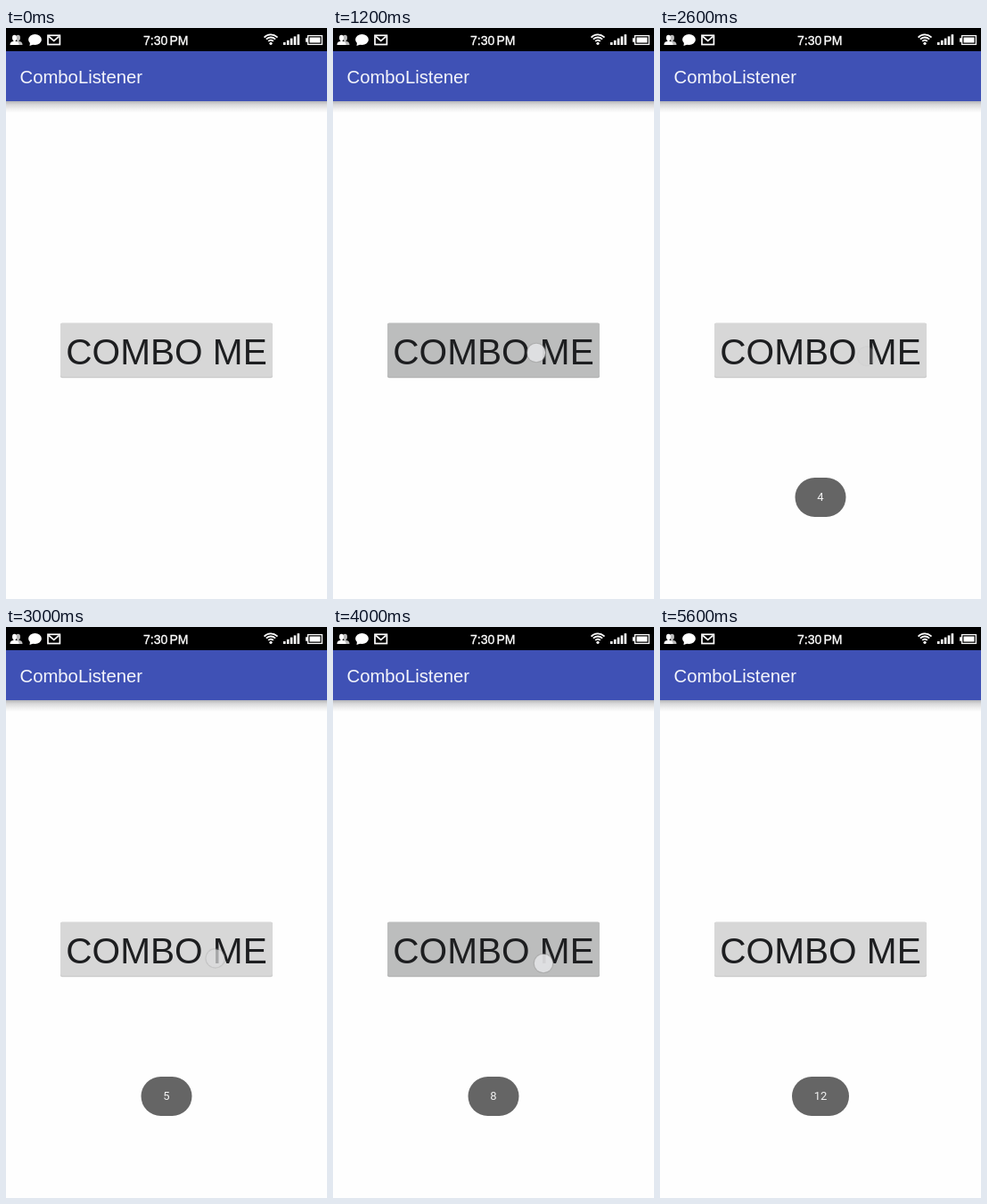
These frames come from a looping animation (360x640 px, 6400 ms). An HTML page with a canvas:

```html
<!DOCTYPE html>
<html lang="en">
<head>
<meta charset="utf-8">
<title>ComboListener</title>
<style>
  html, body { margin: 0; width: 100%; height: 100%; overflow: hidden; background: #fefefe; }
  canvas { display: block; }
</style>
</head>
<body>
<canvas id="stage" width="360" height="640"></canvas>
<script>
const ctx = document.getElementById('stage').getContext('2d');
const LOOP = 6400, STEP = 200, FIRST = 1000;
const SANS = '"Liberation Sans", Arial, sans-serif';

// One letter per step from FIRST: P pressed, R just released, F finger fading, - idle
const TOUCH = 'FPRPRPRPFPRRPRPPRPRPRPF-';
// Step at which the combo counter reaches 2, 3, 4 ...
const HITS = [4, 6, 8, 10, 11, 13, 15, 16, 18, 20, 22];

function rect(x, y, w, h, color) {
  ctx.fillStyle = color;
  ctx.fillRect(x, y, w, h);
}

function round(x, y, w, h, r, color) {
  ctx.fillStyle = color;
  ctx.beginPath();
  ctx.roundRect(x, y, w, h, r);
  ctx.fill();
}

function ellipse(x, y, rx, ry, color) {
  ctx.fillStyle = color;
  ctx.beginPath();
  ctx.ellipse(x, y, rx, ry, 0, 0, Math.PI * 2);
  ctx.fill();
}

function poly(points, color) {
  ctx.fillStyle = color;
  ctx.beginPath();
  points.forEach(([x, y]) => ctx.lineTo(x, y));
  ctx.fill();
}

function text(str, x, y, size, color, family = SANS, align = 'left') {
  ctx.font = `${size}px ${family}`;
  ctx.textAlign = align;
  ctx.fillStyle = color;
  ctx.fillText(str, x, y);
}

function person(x, color) {
  ellipse(x, 11, 2.5, 3.2, color);
  round(x - 1.2, 13, 2.4, 3, 0, color);
  round(x - 5, 15, 10, 4, [4, 4, 0, 0], color);
}

function statusIcons() {
  person(13.5, '#bbb');
  person(9.5, '#fff');

  ellipse(32.5, 13, 7.4, 6, '#fff');
  poly([[27, 16], [26.5, 20], [32, 18]], '#fff');

  ctx.strokeStyle = '#fff';
  ctx.lineWidth = 1.7;
  ctx.strokeRect(47, 8.3, 13.4, 10.2);
  ctx.beginPath();
  ctx.moveTo(48, 9.5);
  ctx.lineTo(53.7, 14.3);
  ctx.lineTo(59.4, 9.5);
  ctx.stroke();

  ctx.lineWidth = 1.8;
  for (const r of [3.8, 7, 10.2]) {
    ctx.beginPath();
    ctx.arc(297, 17.5, r, -Math.PI * 0.76, -Math.PI * 0.24);
    ctx.stroke();
  }
  ellipse(297, 17.3, 1.6, 1.6, '#fff');

  for (let i = 0; i < 5; i++) {
    const h = 3 + i * 2.2;
    rect(311 + i * 3.9, 19 - h, 2.6, h, '#fff');
  }

  ctx.lineWidth = 1.3;
  ctx.strokeRect(338.6, 8.6, 15.8, 9.8);
  rect(340.5, 10.5, 12, 6, '#fff');
  rect(336, 11.3, 2, 4.4, '#fff');
}

function chrome() {
  rect(0, 0, 360, 640, '#fefefe');
  const shade = ctx.createLinearGradient(0, 82, 0, 95);
  shade.addColorStop(0, '#b3b4b8');
  shade.addColorStop(0.3, '#d9d9da');
  shade.addColorStop(0.7, '#f1f1f1');
  shade.addColorStop(1, '#fefefe');
  rect(0, 82, 360, 13, shade);
  rect(0, 26, 360, 56, '#3f51b5');
  rect(0, 0, 360, 26, '#000');
  statusIcons();

  ctx.strokeStyle = '#fff';
  ctx.lineWidth = 0.35;
  text('7:30', 154, 18.5, 14, '#fff');
  ctx.strokeText('7:30', 154, 18.5);
  text('PM', 204.5, 18.5, 14, '#fff', SANS, 'right');
  ctx.strokeText('PM', 204.5, 18.5);
  text('ComboListener', 15.5, 62, 20.3, '#f4f5fb');
}

function button(pressed) {
  round(61, 331, 238, 61.3, 2, pressed ? '#b2b3b3' : '#c9c9c9');
  round(61, 330.5, 238, 60.5, 2, pressed ? '#bcbdbd' : '#d7d7d7');
  text('COMBO ME', 180, 377, 40.6, '#1d1e20', SANS, 'center');
}

function finger(x, y, state) {
  const alpha = { P: 0.87, R: 0.62, F: 0.16 }[state];
  if (!alpha) return;
  ctx.globalAlpha = alpha;
  ellipse(x, y, 11.3, 11.3, 'rgba(150,150,150,0.45)');
  ellipse(x, y, 10.2, 10.2, '#e6e6e8');
  ctx.globalAlpha = 1;
}

function toast(count, color) {
  const w = count > 9 ? 64 : 57;
  round(180 - w / 2, 504, w, 44, 22, color);
  text(count, 180, 530, 13, '#f2f2f2', 'Roboto, sans-serif', 'center');
}

// The finger drifts down and right over the taps
function fingerPos(time) {
  const ease = (a, b) => {
    const u = Math.min(1, Math.max(0, (time - a) / (b - a)));
    return u * u * (3 - 2 * u);
  };
  return [228 + 8 * ease(1800, 3400), 364 + 13 * ease(1800, 4000)];
}

function draw(now) {
  const time = Math.floor((now % LOOP) / STEP) * STEP;
  const step = (time - FIRST) / STEP;
  const state = TOUCH[step] || '-';
  const hits = HITS.filter(s => s <= step).length;

  chrome();
  button(state === 'P');
  finger(...fingerPos(time), state);
  if (hits) toast(hits + 1, step === HITS[0] ? '#7c7f7e' : '#656565');
}

const start = performance.now();
function tick() {
  draw(performance.now() - start);
  requestAnimationFrame(tick);
}
tick();
</script>
</body>
</html>
```
